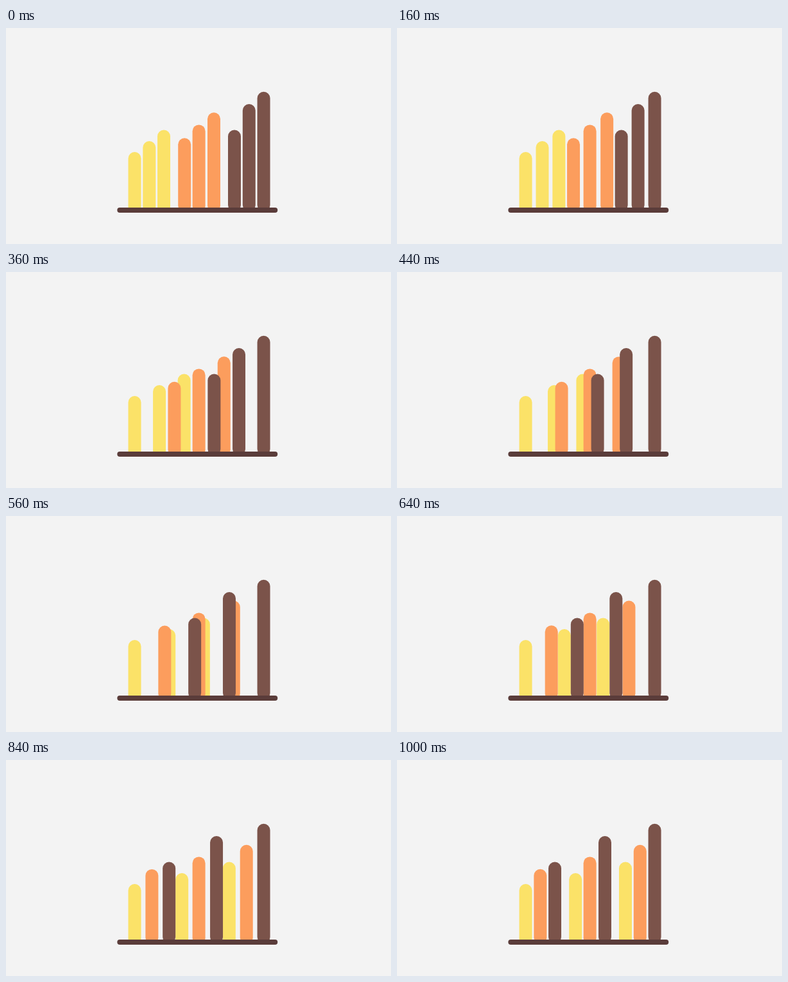
Animation, 600 px wide and 338 px high, one loop 2000 ms. Source, as an HTML page with a canvas:

```html
<!DOCTYPE html>
<html lang="en">
<head>
<meta charset="utf-8">
<title>Regrouping bars</title>
<style>
html, body { margin: 0; width: 100%; height: 100%; overflow: hidden; background: #f3f3f3; }
canvas { display: block; width: 100vw; height: 100vh; }
</style>
</head>
<body>
<canvas id="stage"></canvas>
<script>
const W = 600, H = 338, LOOP = 2000, STEP = 40;
const canvas = document.getElementById('stage');
const ctx = canvas.getContext('2d');

const YELLOW = '#fbe268', ORANGE = '#fc9d5d', BROWN = '#7b534a', BASE = '#5a3c3a';
const slots = [190.5, 213.3, 236, 268.2, 290.6, 314, 346, 368.8, 391.6];

// Painted back to front: slots and tops go from the first to the second value.
const bars = [
  { color: YELLOW, slot: [0, 0], top: [194, 194], bottom: 290 },
  { color: YELLOW, slot: [1, 3], top: [177, 177], bottom: 290 },
  { color: YELLOW, slot: [2, 6], top: [159.5, 159.5], bottom: 290 },
  { color: ORANGE, slot: [3, 1], top: [172.3, 170.8], bottom: 288 },
  { color: ORANGE, slot: [4, 4], top: [151.4, 151.4], bottom: 289 },
  { color: ORANGE, slot: [5, 7], top: [132.2, 132.8], bottom: 288 },
  { color: BROWN, slot: [6, 2], top: [159.6, 159.6], bottom: 287 },
  { color: BROWN, slot: [7, 5], top: [119, 119], bottom: 287 },
  { color: BROWN, slot: [8, 8], top: [99.8, 99.8], bottom: 287 }
];

const clamp = (v, lo, hi) => Math.min(hi, Math.max(lo, v));
const mix = (a, b, p) => a + (b - a) * p;

function pill(color, x, y, w, h) {
  ctx.fillStyle = color;
  ctx.beginPath();
  ctx.roundRect(x, y, w, h, Math.min(w, h) / 2);
  ctx.fill();
}

// Smooth ease at 25 steps a second, with a slight delay building up mid-way.
function progress(time) {
  const step = Math.floor(time / STEP);
  const lag = clamp(0.5 + (step - 9) / 10, 0.5, 1);
  const u = clamp((step - lag) / 24, 0, 1);
  return u * u * (3 - 2 * u);
}

function draw(time) {
  const p = progress(time);
  ctx.setTransform(canvas.width / W, 0, 0, canvas.height / H, 0, 0);
  ctx.fillStyle = '#f3f3f3';
  ctx.fillRect(0, 0, W, H);
  for (const { color, slot, top, bottom } of bars) {
    const x = mix(slots[slot[0]], slots[slot[1]], p);
    const y = mix(top[0], top[1], p);
    pill(color, x, y, 20, bottom - y);
  }
  // Trim the bar ends below the base line.
  ctx.fillStyle = '#f3f3f3';
  ctx.fillRect(0, 285, W, H - 285);
  pill(BASE, 173.3, 281, 250, 8);
}

function resize() {
  const ratio = window.devicePixelRatio || 1;
  canvas.width = Math.round(innerWidth * ratio);
  canvas.height = Math.round(innerHeight * ratio);
}

const start = performance.now();
function tick() {
  draw((performance.now() - start) % LOOP);
  requestAnimationFrame(tick);
}

addEventListener('resize', resize);
resize();
tick();
</script>
</body>
</html>
```
